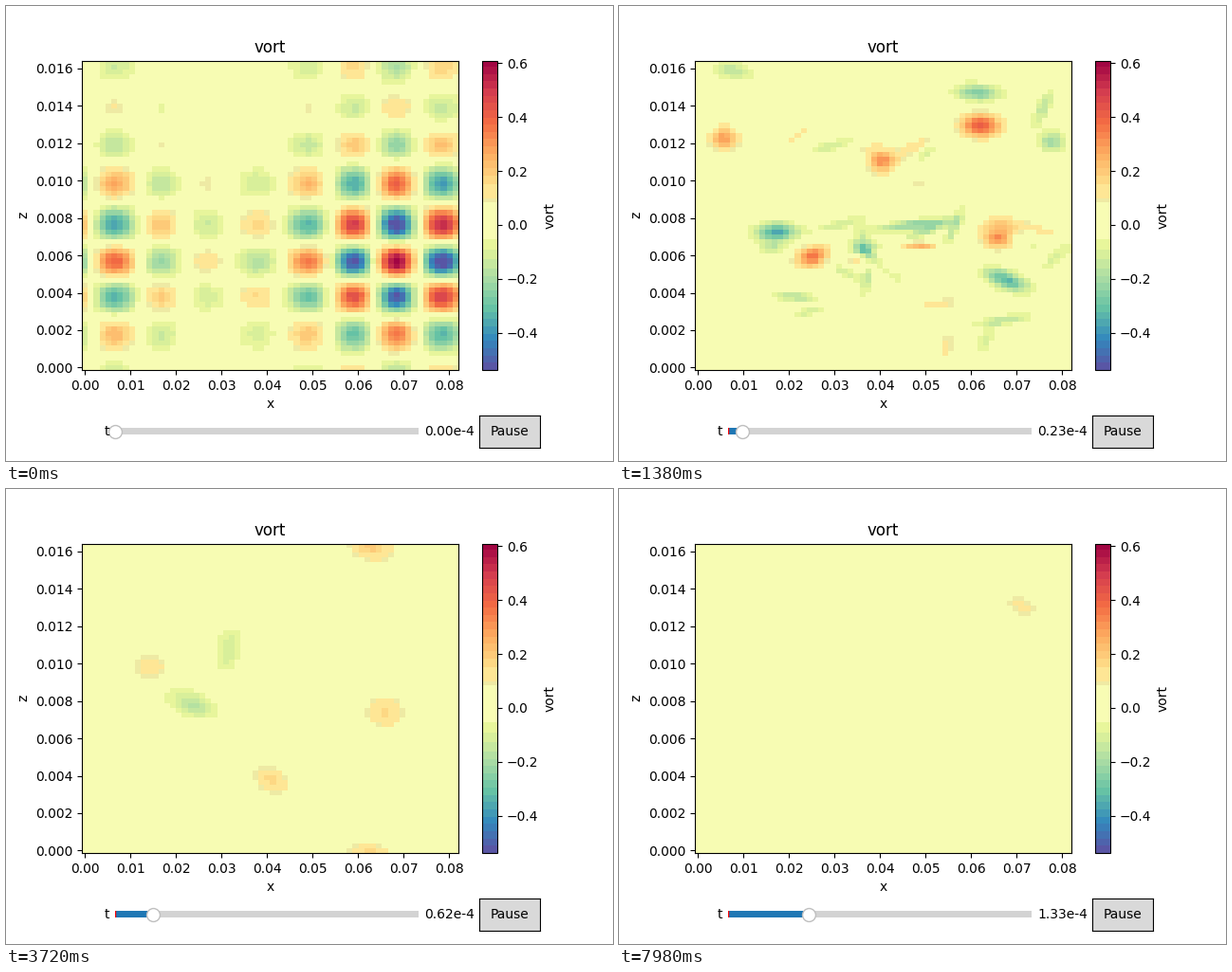
A matplotlib script that plays this animation: 640 px wide and 480 px high, repeating every 8000 ms.

```python
import numpy as np
import matplotlib.pyplot as plt
from matplotlib.animation import FuncAnimation
from matplotlib.colors import ListedColormap
from matplotlib.widgets import Button, Slider

N = 64                       # cells per side, periodic box
DX, DZ = 0.001292, 0.0002584
VMIN, VMAX = -0.5377, 0.609
STEP_MS, TICK_MS, LOOP_MS = 60, 40, 8000
BREAKUP = 16                 # step at which the lattice is fully stirred

CELLS = np.arange(N) + 0.5
U, V = np.meshgrid(CELLS, CELLS)


def wrap(d):
    return (d + N / 2) % N - N / 2


def blob(u, v, long, short, angle, amp):
    """Rotated Gaussian in cell coordinates."""
    a = np.radians(angle)
    du, dv = wrap(U - u), wrap(V - v)
    p = (du * np.cos(a) + dv * np.sin(a)) / long
    q = (dv * np.cos(a) - du * np.sin(a)) / short
    return amp * np.exp(-0.5 * (p * p + q * q))


def wave(first, bend, crest, mean, swell):
    """Four slightly bent periods under a slow envelope."""
    s = CELLS - first - 0.43 * np.cos(4 * np.pi * (CELLS - bend) / N)
    return (mean + swell * np.cos(2 * np.pi * (CELLS - crest) / N)) * np.cos(8 * np.pi * s / N)


def velocity(w):
    k = 2 * np.pi * np.fft.fftfreq(N)
    ku, kv = np.meshgrid(k, k)
    k2 = ku ** 2 + kv ** 2
    k2[0, 0] = 1
    psi = -np.fft.fft2(w) / k2
    psi[0, 0] = 0
    return np.fft.ifft2(-1j * kv * psi).real, np.fft.ifft2(1j * ku * psi).real


def sample(w, u, v):
    """Periodic bilinear lookup."""
    u, v = u - 0.5, v - 0.5
    i, j = np.floor(u).astype(int), np.floor(v).astype(int)
    fu, fv = u - i, v - j
    i0, i1, j0, j1 = i % N, (i + 1) % N, j % N, (j + 1) % N
    low = w[j0, i0] * (1 - fu) + w[j0, i1] * fu
    high = w[j1, i0] * (1 - fu) + w[j1, i1] * fu
    return low * (1 - fv) + high * fv


def stir(w, steps, speed=0.8):
    """Let the vorticity carry itself along (semi-Lagrangian steps)."""
    vu, vv = velocity(w)
    scale = speed / np.sqrt(np.mean(vu ** 2 + vv ** 2))
    fields = [w]
    for _ in range(steps):
        vu, vv = velocity(w)
        w = sample(w, U - scale * vu, V - scale * vv)
        fields.append(w)
    return fields


LATTICE = stir(np.outer(wave(6.6, 11, 24, 0.38, 0.23), wave(5.7, 10, 55, 0.61, 0.39)),
               BREAKUP)


class Vortex:
    """Travels through key points, weakening and widening by power laws."""
    STEPS = np.array([16, 32, 46, 81, 112, 133])
    FADE = 8

    def __init__(self, *points, strength, radius=2, stretch=1, angle=0, spin=0, start=0):
        self.steps = self.STEPS[start:start + len(points)]
        self.u, self.v = np.transpose(points)
        self.strength, self.radius = strength, radius
        self.stretch, self.angle, self.spin = np.sqrt(stretch), angle, spin

    def field(self, step):
        first, last = self.steps[0], self.steps[-1]
        fade = 1 - max(first - step, step - last, 0) / self.FADE
        if fade <= 0:
            return 0
        age = max(step, BREAKUP) / 32
        size = self.radius * age ** 0.25
        return blob(np.interp(step, self.steps, self.u), np.interp(step, self.steps, self.v),
                    size * self.stretch, size / self.stretch,
                    self.angle + self.spin * (step - BREAKUP),
                    0.3 * self.strength * fade * age ** -0.8)


VORTICES = [
    Vortex((3.2, 41.5), (7.2, 56), (8.7, 58.2), strength=0.75),
    Vortex((34, 42), (28.9, 44.7), (18.4, 45.3), (3.5, 30.4), strength=0.8),
    Vortex((17, 21.4), (23.9, 26), (30.8, 17.9), (34, 11.6), strength=0.95,
           stretch=1.4, spin=3),
    Vortex((50.5, 30), (53, 25.7), (54.9, 28), (47.6, 30.4), (46.5, 30.4),
           strength=0.9, radius=2.4),
    Vortex((46.5, 41.5), (51.3, 62), (44.7, 64.8), (54.6, 61.2), (53.9, 65.6), (55.5, 51),
           strength=1.08, radius=2.3, stretch=1.4, spin=-0.38),
    Vortex((17, 29.2), (9.8, 27.6), (16.7, 30.2), (21.2, 31.5), strength=-0.95,
           stretch=1.8, angle=8, spin=-0.75),
    Vortex((48.5, 59.6), (47.5, 54.3), (35.2, 51.8), (12.7, 30.4), strength=-0.7,
           stretch=2.2, angle=-20, spin=2.2),
    Vortex((59.3, 20.8), (45.3, 15.3), (42, 28), strength=-0.85,
           stretch=2, angle=-5, spin=-2.7),
    Vortex((43.5, 29), (30, 31.5), (36.5, 15), strength=-0.65,
           stretch=6, angle=51, spin=-6.2),
    Vortex((59.3, 50.4), (62.3, 43), (61, 47.5), strength=-0.55, radius=1.7),
    Vortex((5.5, 61.5), (7.5, 62.3), strength=-0.4, stretch=2, spin=-1.5),
    Vortex((6.8, 21.4), strength=-0.6, radius=2.3),
    Vortex((56, 35.5), strength=-0.65, stretch=2.2, angle=25),
    Vortex((26.7, 43.6), strength=-0.9, radius=1.7, stretch=7, angle=64, start=4),
]


class Shred:
    """Thin streak that slides along itself and fades."""
    LIFE, SLIDE = 13, 0.3

    def __init__(self, rng, peak):
        self.peak = peak
        self.u, self.v = rng.normal(40, 17), rng.normal(27, 15)
        self.long, self.short = rng.uniform(1.4, 3.8), rng.uniform(0.6, 1)
        self.angle = rng.normal(20, 40)
        self.amp = rng.uniform(0.13, 0.24) * (BREAKUP / peak) ** 0.6 * rng.choice([-1, -1, 1])

    def field(self, step):
        d = step - self.peak
        fade = 1 - (d / self.LIFE) ** 2
        if fade <= 0:
            return 0
        a = np.radians(self.angle)
        return blob(self.u + self.SLIDE * d * np.cos(a), self.v + self.SLIDE * d * np.sin(a),
                    self.long, self.short, self.angle, self.amp * fade)


rng = np.random.default_rng(4)
SHREDS = [Shred(rng, peak) for peak, count in ((16, 26), (32, 8), (46, 5))
          for _ in range(count)]


def field(step):
    x = np.clip((step - 6) / (BREAKUP - 6), 0, 1)
    total = np.zeros((N, N))
    if x < 1:
        total += (1 - x * x * (3 - 2 * x)) * LATTICE[step]
    if step > 0:
        total += sum(part.field(step) for part in VORTICES + SHREDS)
    return total


def banded_map():
    base = plt.get_cmap("Spectral_r")(np.arange(256))
    edges = np.r_[0:85:6, 92, 100, 108, 139, 142, 154, 161:252:6, 256]
    lut = base.copy()
    for a, b in zip(edges[:-1], edges[1:]):
        lut[a:b] = base[(a + b) // 2]
    lut[108:139] = base[120]
    lut[139:142, :3] = 0.937, 0.918, 0.645
    return ListedColormap(lut)


fig, ax = plt.subplots(figsize=(6.4, 4.8), dpi=100)
fig.subplots_adjust(bottom=0.2)
image = ax.imshow(field(0), cmap=banded_map(), vmin=VMIN, vmax=VMAX,
                  origin="lower", aspect="auto", interpolation="nearest",
                  extent=(-DX / 2, (N - 0.5) * DX, -DZ / 2, (N - 0.5) * DZ))
ax.set(title="vort", xlabel="x", ylabel="z")
fig.colorbar(image, ax=ax, label="vort")

slider = Slider(fig.add_axes([0.18, 0.05, 0.5, 0.03]), "t", 0, 5,
                valinit=0, valfmt="%.2fe-4")
slider.drawon = False
button = Button(fig.add_axes([0.78, 0.03, 0.1, 0.07]), "Pause")


def update(tick):
    step = int(round(tick * TICK_MS / STEP_MS))
    image.set_data(field(step))
    slider.set_val(step / 100)
    return [image]


anim = FuncAnimation(fig, update, frames=LOOP_MS // TICK_MS, interval=TICK_MS,
                     repeat=True, repeat_delay=0)
plt.show()
```
